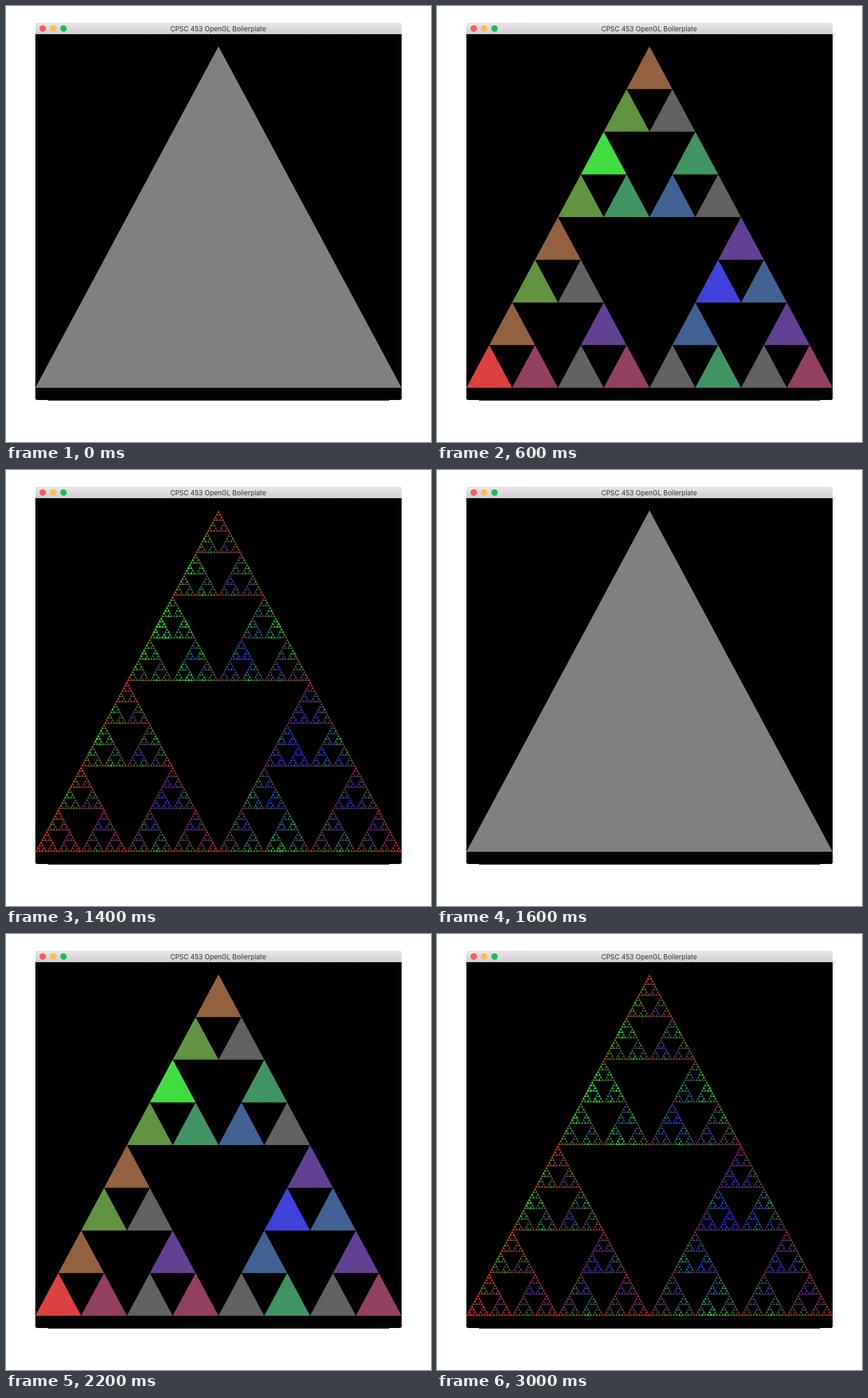
An HTML page with a canvas for the animation above (3200 ms loop, 738 px wide and 758 px high).

```html
<!DOCTYPE html>
<html lang="en">
<head>
<meta charset="utf-8">
<title>Sierpinski triangle</title>
<style>
  html, body { margin: 0; width: 738px; height: 758px; overflow: hidden; background: #fff; }
  svg, canvas { position: absolute; left: 0; top: 0; display: block; }
  text { font: 11.6px Inter, "Open Sans", sans-serif; fill: #363436; text-anchor: middle; }
</style>
</head>
<body>
<svg width="738" height="758">
  <defs>
    <linearGradient id="bar" x2="0" y2="1">
      <stop stop-color="#e9e7e9"/>
      <stop offset="1" stop-color="#d0ced0"/>
    </linearGradient>
  </defs>
  <path d="M51 49V33q0-4 4-4H683q4 0 4 4V49z" fill="url(#bar)"/>
  <path d="M51 49H687V682q0 3-3 3H665v1H73v-1H54q-3 0-3-3z"/>
  <circle cx="63.7" cy="39.2" r="5.6" fill="#fc5b57"/>
  <circle cx="81.8" cy="39.2" r="5.6" fill="#fdbc4e"/>
  <circle cx="99.9" cy="39.2" r="5.6" fill="#06c658"/>
  <text x="368.3" y="43.6">CPSC 453 OpenGL Boilerplate</text>
</svg>
<canvas id="stage" width="738" height="758"></canvas>
<script>
const ctx = document.getElementById("stage").getContext("2d");
const STEP = 200, LEVELS = 8;
const LEFT = [51, 663.8], TOP = [369, 70.2], RIGHT = [687, 663.8];

const mid = (p, q) => [(p[0] + q[0]) / 2, (p[1] + q[1]) / 2];

// Brighten one channel and dim the other two.
const tint = (rgb, channel) => rgb.map((v, i) => v * (i === channel ? 1.2 : 0.8));

function fillTriangle(a, b, c, rgb) {
  ctx.fillStyle = `rgb(${rgb.map(v => Math.min(255, Math.round(v * 255)))})`;
  ctx.beginPath();
  ctx.moveTo(...a);
  ctx.lineTo(...b);
  ctx.lineTo(...c);
  ctx.fill();
}

// The order of the corners decides which child gets which channel.
function sierpinski(a, b, c, rgb, depth) {
  if (!depth) return fillTriangle(a, b, c, rgb);
  const ab = mid(a, b), ac = mid(a, c), bc = mid(b, c);
  sierpinski(a, ab, ac, tint(rgb, 0), depth - 1);
  sierpinski(b, ab, bc, tint(rgb, 1), depth - 1);
  sierpinski(c, ac, bc, tint(rgb, 2), depth - 1);
}

let shown = -1;
const start = performance.now();

function draw() {
  const elapsed = Math.max(0, performance.now() - start);
  const level = Math.floor(elapsed / STEP) % LEVELS;
  if (level !== shown) {
    shown = level;
    ctx.clearRect(0, 0, 738, 758);
    sierpinski(LEFT, TOP, RIGHT, [0.5, 0.5, 0.5], level);
  }
  requestAnimationFrame(draw);
}
draw();
</script>
</body>
</html>
```
